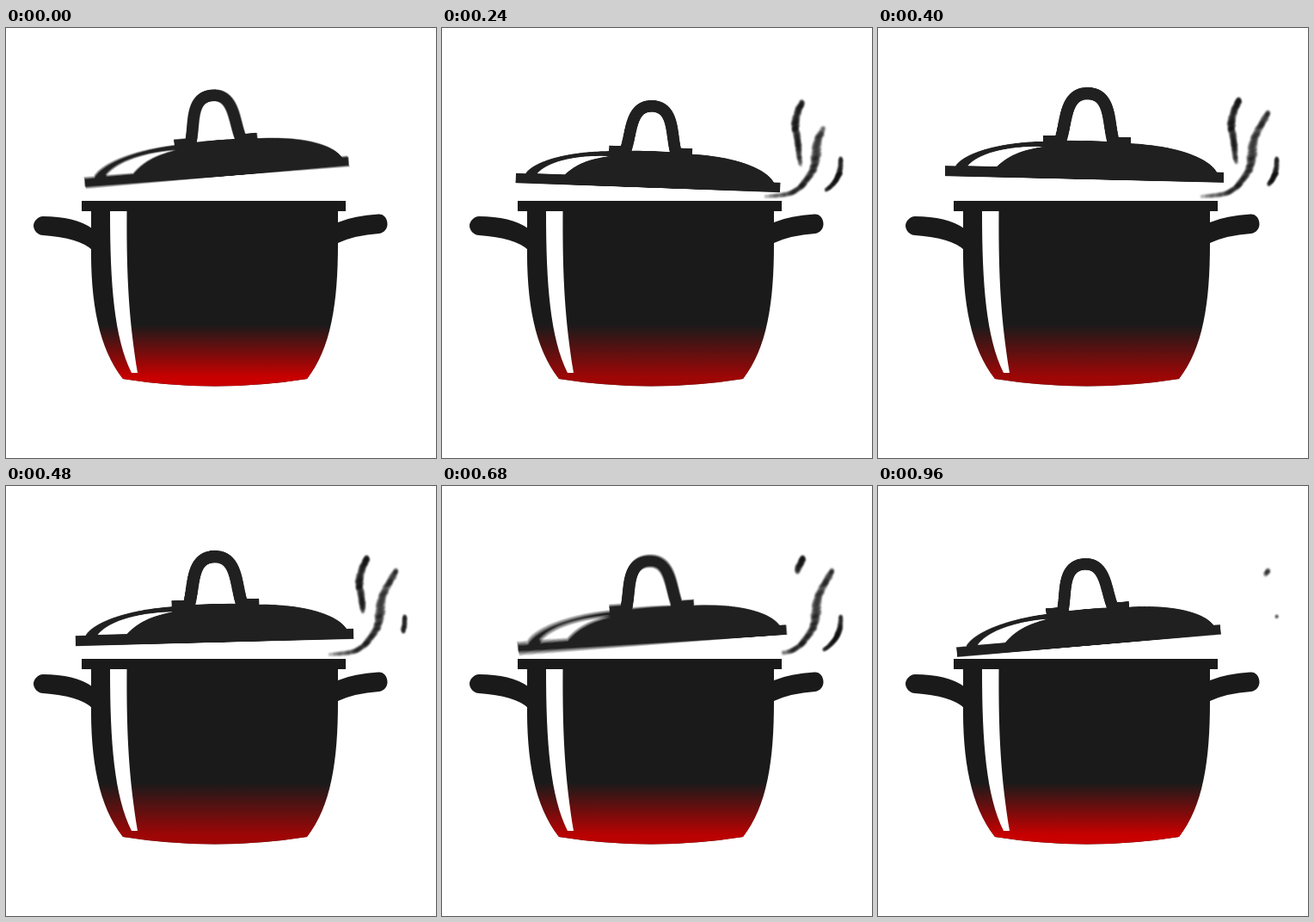
An HTML page with a canvas for the animation above (1000 ms loop, 500x500 px).

```html
<!DOCTYPE html>
<html lang="en">
<head>
<meta charset="utf-8">
<title>Simmering pot</title>
<style>
html, body { margin: 0; width: 100%; height: 100%; overflow: hidden; background: #fff; }
canvas { display: block; width: 500px; height: 500px; }
</style>
</head>
<body>
<canvas id="stage" width="500" height="500"></canvas>
<script>
const LOOP = 1000, STEP = 40, INK = '#1a1a1a';
const ctx = document.getElementById('stage').getContext('2d');

function layer(w, h) {
  const c = document.createElement('canvas');
  c.width = w;
  c.height = h;
  return c.getContext('2d');
}

// time, centre x, centre y, degrees, scale, smear in degrees, smear pivot x
const LID = [
  [0,   245,   167.5, -4.7, .95,  .6,  20],
  [240, 239.5, 180,   2.05, .95,  .15, 0],
  [400, 240,   170,   1.35, 1,    .12, 0],
  [560, 245,   182,   -4.3, .997, .2,  0],
  [680, 244.5, 178,   -4,   .966, .65, 120],
  [840, 241,   172,   -.7,  1.015, .25, -60],
  [960, 245,   180,   -4.9, .95,  .2,  0]
];

const HEAT = [[0, 1], [200, .76], [560, .76], [680, .92], [840, .93], [960, 1]];

// Each puff: curve from bottom to top, widths, and when its tail and head move
const PUFFS = [
  { path: [[417, 160], [414, 135], [411, 108], [420, 83]], width: [4, 9, 8], faint: .2,
    head: [[60, 0], [240, .95], [300, 1]],
    tail: [[280, 0], [400, .05], [560, .33], [680, .75], [760, 1]] },
  { path: [[376, 196], [410, 190], [432, 163], [437, 130], [454, 98]], width: [5, 12, 9], faint: .3,
    head: [[40, 0], [240, .85], [340, 1]],
    tail: [[560, 0], [680, .15], [840, .6], [960, .94], [1000, 1]] },
  { path: [[444, 191], [455, 181], [462, 168], [464, 151]], width: [4, 6, 4], faint: .1,
    head: [[120, 0], [240, 1]],
    tail: [[200, 0], [240, .1], [400, .3], [560, .96], [600, 1]] },
  { path: [[444, 191], [455, 181], [462, 168], [464, 151]], width: [4, 6, 4], faint: .1,
    head: [[480, 0], [560, .6], [640, 1]],
    tail: [[540, .1], [600, 0], [680, 0], [840, .42], [960, .95], [1000, 1]] }
];

const mix = (a, b, k) => a + (b - a) * k;
const smooth = k => k * k * (3 - 2 * k);

function sample(table, t, ease = k => k) {
  if (t <= table[0][0]) return table[0].slice(1);
  for (let i = 1; i < table.length; i++) {
    const a = table[i - 1], b = table[i];
    if (t <= b[0]) {
      const k = ease((t - a[0]) / (b[0] - a[0]));
      return a.slice(1).map((v, j) => mix(v, b[j + 1], k));
    }
  }
  return table[table.length - 1].slice(1);
}

function noise(n) {
  const v = Math.sin(n * 127.1 + 11.7) * 43758.5453;
  return v - Math.floor(v);
}

const body = new Path2D(
  'M99 212V250C98 320 108 372 136 408Q243 425 350 408C378 372 386 320 386 250V212Z');
const trim = new Path2D(
  'M88 201H395V213H88Z' +
  'M43 219Q80 219 100 233V258Q85 244 43 241C37 241 32 235 32 230C32 225 37 219 43 219Z' +
  'M433 216.5Q405 218 386 226V250Q405 241 434 239C440 238 443.5 233 443.5 228C443.5 221 439 216 433 216.5Z');
const shine = new Path2D(
  'M121 213H140.5C140 290 143 340 153 401H146C126 360 121 300 121 213Z');

function drawPot(heat) {
  ctx.fillStyle = INK;
  ctx.fill(body);
  ctx.fill(trim);
  const glow = ctx.createLinearGradient(0, 345, 0, 406);
  glow.addColorStop(0, 'rgba(200,0,0,0)');
  glow.addColorStop(1, 'rgb(200,0,0)');
  ctx.globalAlpha = heat;
  ctx.fillStyle = glow;
  ctx.fill(body);
  ctx.globalAlpha = 1;
  ctx.fillStyle = '#fff';
  ctx.fill(shine);
}

// The lid is kept at double size, centred on the middle of its rim
function makeLid() {
  const g = layer(720, 320);
  g.setTransform(2, 0, 0, 2, 360, 240);
  g.fillStyle = g.strokeStyle = INK;
  g.fill(new Path2D(
    'M-162 -6H-150C-140 -22 -98 -35 -49 -37Q2 -41 53 -37C100 -36 142 -25 154 -6H162V6H-162Z'));
  g.fillRect(-49, -44, 26, 9);
  g.fillRect(27, -44, 26, 9);
  g.lineWidth = 14.5;
  g.stroke(new Path2D('M-29 -38C-22 -58 -26 -94 2 -94S26 -58 33 -38'));
  g.globalCompositeOperation = 'destination-out';
  g.fill(new Path2D('M-136 -6.5C-125 -20 -95 -31 -48 -31C-75 -26 -88 -20 -102 -6.5Z'));
  return g.canvas;
}

const lid = makeLid();
const smearLayer = layer(500, 500);

function drawLid(t) {
  const [x, y, deg, scale, smear, pivot] = sample(LID, t, smooth);
  const g = smearLayer, copies = 8, rad = Math.PI / 180;
  g.setTransform(1, 0, 0, 1, 0, 0);
  g.clearRect(0, 0, 500, 500);
  g.globalCompositeOperation = 'lighter';
  g.globalAlpha = 1 / copies;
  for (let i = 0; i < copies; i++) {
    const off = (i / (copies - 1) * 2 - 1) * smear * rad;
    g.setTransform(1, 0, 0, 1, x, y);
    g.rotate(deg * rad);
    g.translate(pivot, 0);
    g.rotate(off);
    g.translate(-pivot, 0);
    g.scale(scale * (1 + off * .5), scale);
    g.drawImage(lid, -180, -120, 360, 160);
  }
  ctx.drawImage(g.canvas, 0, 0);
}

function along(pts, u) {
  const n = pts.length - 1, s = Math.min(u * n, n - 1e-6);
  const i = Math.floor(s), k = s - i;
  const p = j => pts[Math.max(0, Math.min(n, j))];
  return [0, 1].map(c => {
    const a = p(i - 1)[c], b = p(i)[c], d = p(i + 1)[c], e = p(i + 2)[c];
    return b + .5 * k * (d - a + k * (2 * a - 5 * b + 4 * d - e + k * (3 * (b - d) + e - a)));
  });
}

function drawPuff(puff, seed, t) {
  const [head] = sample(puff.head, t), [tail] = sample(puff.tail, t);
  if (head <= tail) return;
  const count = 90, [w0, w1, w2] = puff.width;
  for (let i = 0; i <= count; i++) {
    const u = i / count;
    if (u < tail || u > head) continue;
    const [x, y] = along(puff.path, u);
    const width = u < .6 ? mix(w0, w1, u / .6) : mix(w1, w2, (u - .6) / .4);
    const end = Math.min(1, .45 + Math.min(u - tail, head - u) * 8);
    const n = i + seed * 200;
    ctx.globalAlpha = Math.min(1, (.25 + .4 * noise(n)) * Math.min(1, .35 + u / puff.faint * .65));
    ctx.beginPath();
    ctx.ellipse(x + (noise(n + 50) - .5) * 1.6, y, width / 2 * end * (.8 + .3 * noise(n + 90)),
      Math.min(2.4, width * .35), -.35, 0, Math.PI * 2);
    ctx.fill();
  }
}

function drawSteam(t) {
  ctx.save();
  ctx.filter = 'blur(0.8px)';
  ctx.fillStyle = '#111';
  PUFFS.forEach((puff, i) => drawPuff(puff, i, t));
  ctx.restore();
}

function draw(t) {
  ctx.fillStyle = '#fff';
  ctx.fillRect(0, 0, 500, 500);
  drawPot(sample(HEAT, t)[0]);
  drawSteam(t);
  drawLid(t);
}

const start = performance.now();
function tick() {
  const t = (performance.now() - start) % LOOP;
  draw(Math.floor(t / STEP) * STEP);
  requestAnimationFrame(tick);
}
tick();
</script>
</body>
</html>
```
